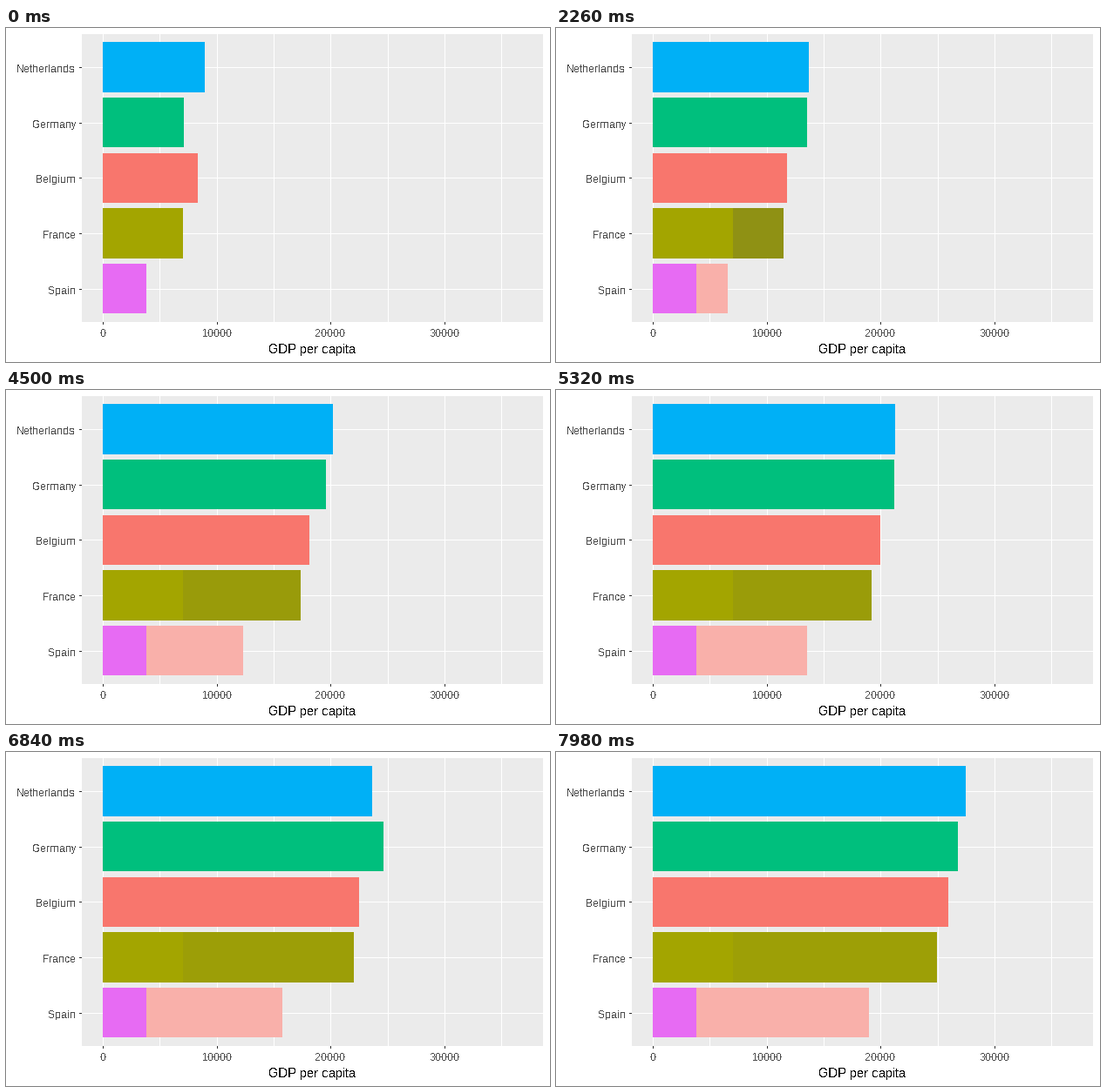
These frames come from a looping animation (624x384 px, 8000 ms). A matplotlib script:

```python
import numpy as np
import matplotlib.pyplot as plt
from matplotlib.animation import FuncAnimation
from matplotlib.patches import Rectangle

W, H, DPI = 624, 384, 100
plt.rcParams.update({
    "font.family": "Liberation Sans",
    "text.hinting": "default",
    "text.hinting_factor": 1,
    "text.antialiased": False,
    "toolbar": "None",
})

# Turning points of growth, in five-year periods, and thousands reached there
TURNS = [0, 2.4, 5, 6, 7, 8.2]
COUNTRIES = [
    ("Netherlands", "#00B0F6", [8.94, 13.82, 21.21, 21.40, 23.65, 27.48]),
    ("Germany", "#00BF7D", [7.14, 13.64, 20.51, 22.03, 24.64, 26.76]),
    ("Belgium", "#F8766D", [8.34, 11.85, 19.12, 20.98, 22.53, 25.97]),
    ("France", "#A3A500", [7.03, 11.54, 18.29, 20.29, 22.06, 24.94]),
    ("Spain", "#E76BF3", [3.83, 6.61, 13.24, 13.93, 15.76, 18.97]),
]
STEPS_PER_PERIOD = 20.86
TICK = 20

# Layout in pixels
LEFT, TOP, RIGHT, BOTTOM = 87, 7, 616, 338
X0, PX_PER_THOUSAND = 111.05, 13.069
PITCH, BAR_TOP, BAR_HEIGHT, MID = 63.7, 16.3, 57.3, 45
START = int(X0)

TICK_COLOR, LABEL_COLOR = "#333333", "#4D4D4D"
PINK = (0.975, 0.69, 0.665)

fig = plt.figure(figsize=(W / DPI, H / DPI), dpi=DPI, facecolor="white")
ax = fig.add_axes([0, 0, 1, 1])
ax.set_xlim(0, W)
ax.set_ylim(H, 0)
ax.axis("off")


def x_px(thousands):
    return round(X0 + thousands * PX_PER_THOUSAND)


def rect(x, y, w, h, color, z=1):
    box = Rectangle((x, y), w, h, facecolor=color, linewidth=0,
                    antialiased=False, zorder=z)
    ax.add_patch(box)
    return box


def label(x, y, text, px, color, ha):
    ax.text(x, y, text, fontsize=px * 72 / DPI, color=color, ha=ha,
            va="baseline")


def bar(row, thousands, color, z):
    y = BAR_TOP + PITCH * row
    top, bottom = round(y), round(y + BAR_HEIGHT)
    return rect(START, top, x_px(thousands) - START, bottom - top, color, z)


def draw_panel():
    rect(LEFT, TOP, RIGHT - LEFT, BOTTOM - TOP, "#EBEBEB")
    for thousands in range(0, 40, 5):
        x = x_px(thousands)
        rect(x, TOP, 1, BOTTOM - TOP, "white", 2)
        if thousands % 10 == 0:
            rect(x, BOTTOM, 1, 3, TICK_COLOR, 2)
            label(x, 355, str(thousands * 1000), 12, LABEL_COLOR, "center")
    for row, (name, _, _) in enumerate(COUNTRIES):
        y = round(MID + PITCH * row)
        rect(LEFT, y, RIGHT - LEFT, 1, "white", 2)
        rect(LEFT - 3, y, 3, 1, TICK_COLOR, 2)
        label(80, y + 6, name, 12, LABEL_COLOR, "right")
    label(351, 374, "GDP per capita", 15, "black", "center")


draw_panel()
growing = []
for row, (_, color, values) in enumerate(COUNTRIES):
    bar(row, values[0], color, 4)
    growing.append(bar(row, values[0], color, 3))
france, spain = growing[3:]
spain.set_facecolor(PINK)


def step_at(ms):
    """Steps come in threes, held for 20, 20 and 100 ms."""
    group, rest = divmod(ms + 20, 140)
    return 3 * group + min(rest // 20, 2) - 1


def update(frame):
    step = step_at(frame * TICK)
    for box, (_, _, values) in zip(growing, COUNTRIES):
        thousands = np.interp(step / STEPS_PER_PERIOD, TURNS, values)
        box.set_width(x_px(thousands) - START)

    # The grown part of the olive bar starts dull and gains colour
    dull = min(28, 980 / max(step, 1))
    france.set_facecolor(((163 - dull) / 255, (165 - dull) / 255, dull / 255))
    return growing


anim = FuncAnimation(fig, update, frames=400, interval=TICK, repeat=True,
                     repeat_delay=0, blit=False, cache_frame_data=False)
plt.show()
```
